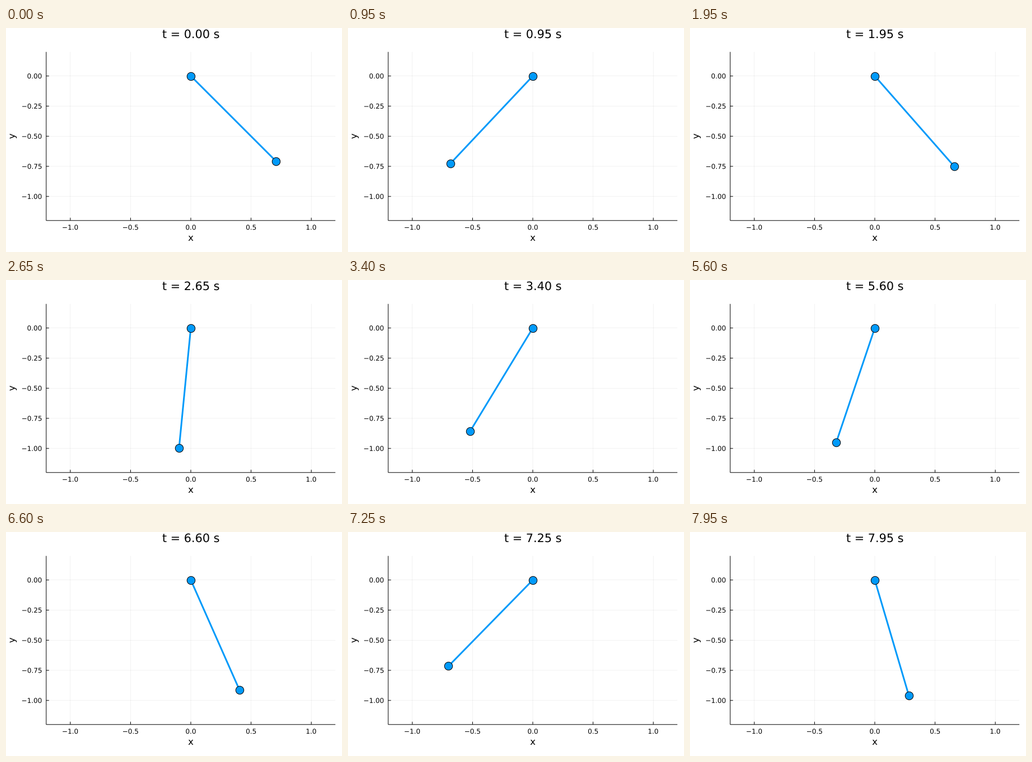
These frames come from a looping animation (600x400 px, 8 s). A matplotlib script:

```python
import math

import matplotlib.pyplot as plt
from matplotlib.animation import FuncAnimation
from matplotlib.patches import PathPatch
from matplotlib.textpath import TextPath
from matplotlib.transforms import Affine2D

W, H, DPI = 600, 400, 100
FRAMES, STEP = 160, 0.05
GRAVITY, LENGTH, START = 9.8, 1.0, math.pi / 4
BLUE = "#009afa"
LEFT, RIGHT, TOP, BOTTOM = 71.8, 588.2, 42.7, 343.8

plt.rcParams["font.family"] = "DejaVu Sans"


def pt(px):
    return px * 72 / DPI


def px(x):
    return LEFT + (x + 1.2) / 2.4 * (RIGHT - LEFT)


def py(y):
    return TOP + (0.2 - y) / 1.4 * (BOTTOM - TOP)


def swing(substeps=20):
    """Pendulum angle at every frame, integrated with RK4."""
    def accel(a):
        return -GRAVITY / LENGTH * math.sin(a)

    h = STEP / substeps
    a, w = START, 0.0
    angles = []
    for _ in range(FRAMES):
        angles.append(a)
        for _ in range(substeps):
            a1, w1 = w, accel(a)
            a2, w2 = w + h / 2 * w1, accel(a + h / 2 * a1)
            a3, w3 = w + h / 2 * w2, accel(a + h / 2 * a2)
            a4, w4 = w + h * w3, accel(a + h * a3)
            a += h / 6 * (a1 + 2 * a2 + 2 * a3 + a4)
            w += h / 6 * (w1 + 2 * w2 + 2 * w3 + w4)
    return angles


# One axes in stage pixels, y pointing down
fig = plt.figure(figsize=(W / DPI, H / DPI), dpi=DPI, facecolor="white")
ax = fig.add_axes([0, 0, 1, 1])
ax.set_xlim(0, W)
ax.set_ylim(H, 0)
ax.axis("off")


def line(x0, y0, x1, y1, width=1, **kw):
    ax.plot([x0, x1], [y0, y1], color="black", linewidth=pt(width),
            solid_capstyle="butt", snap=False, **kw)


def outline(s, x, y, size, align=0.5, turn=0):
    """Text as a path: baseline at y, align 0.5 is centred, 1 is right."""
    path = TextPath((0, 0), s, size=size)
    box = path.get_extents()
    shift = -(box.x0 + align * box.width)
    move = Affine2D().translate(shift, 0).rotate_deg(turn)
    return move.scale(1, -1).translate(x, y).transform_path(path)


def text(*args, **kw):
    patch = PathPatch(outline(*args, **kw), facecolor="black", linewidth=0,
                      snap=False)
    return ax.add_patch(patch)


def label(value, digits):
    return f"{value:.{digits}f}".replace("-", "\u2212")


for x in (-1, -0.5, 0, 0.5, 1):
    line(px(x), TOP, px(x), BOTTOM, 0.5, alpha=0.1)
    line(px(x), BOTTOM, px(x), BOTTOM - 5)
    text(label(x, 1), px(x), 360.2, 12)
for y in (-1, -0.75, -0.5, -0.25, 0):
    line(LEFT, py(y), RIGHT, py(y), 0.5, alpha=0.1)
    line(LEFT, py(y), LEFT + 5, py(y))
    text(label(y, 2), 63.5, py(y) + 4.4, 12, align=1)
line(LEFT, TOP, LEFT, BOTTOM)
line(LEFT, BOTTOM, RIGHT, BOTTOM)
text("x", px(0), 380, 16.5)
text("y", 15.7, py(-0.5), 16.5, turn=90)
title = text("t", px(0), 18, 20.8)

rod, = ax.plot([], [], color=BLUE, linewidth=pt(3), marker="o",
               markersize=pt(14.4), markeredgecolor="black",
               markeredgewidth=pt(1), snap=False, zorder=5)

angles = swing()


def draw(i):
    a = angles[i]
    rod.set_data([px(0), px(LENGTH * math.sin(a))],
                 [py(0), py(-LENGTH * math.cos(a))])
    title.set_path(outline(f"t = {i * STEP:.2f} s", px(0), 18, 20.8))
    return rod, title


anim = FuncAnimation(fig, draw, frames=FRAMES, interval=STEP * 1000,
                     repeat=True, repeat_delay=0, blit=False)
plt.show()
```
